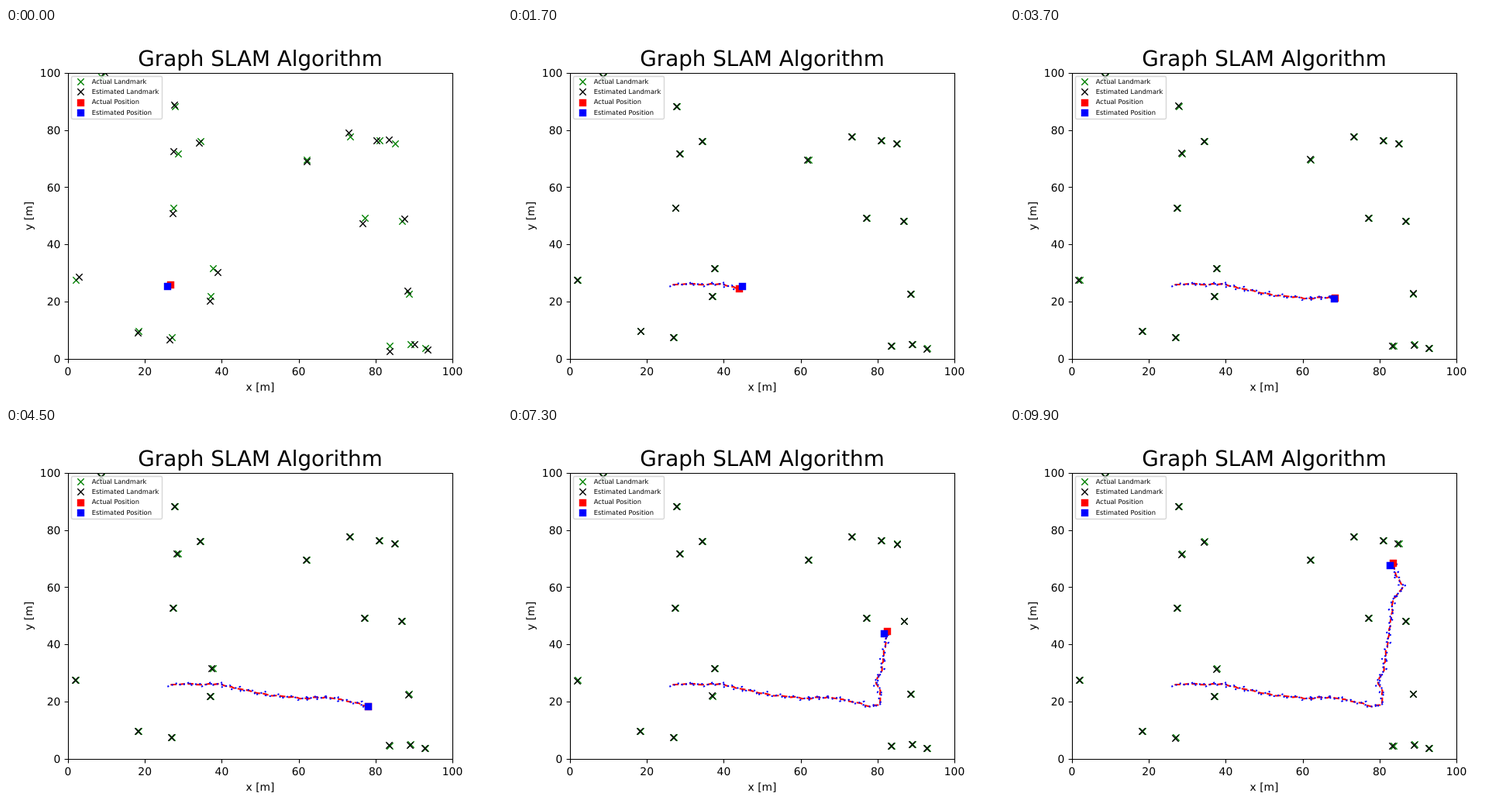
An HTML page for the animation above (10 s loop, 640 px wide and 480 px high).

```html
<!DOCTYPE html>
<html lang="en">
<head>
<meta charset="utf-8">
<title>Graph SLAM Algorithm</title>
<style>
html, body { margin: 0; width: 100%; height: 100%; overflow: hidden; background: #fff; }
svg { display: block; font: 13.89px "DejaVu Sans", sans-serif; text-rendering: geometricPrecision; }
</style>
</head>
<body>
<svg width="640" height="480" viewBox="0 0 640 480">
  <clipPath id="plot"><rect x="80" y="58" width="497" height="370"/></clipPath>
  <g id="scene" clip-path="url(#plot)"></g>
  <g id="axes"></g>
  <g id="legend" font-size="8.33"></g>
</svg>
<script>
const FRAME = 100, COUNT = 100;
const $ = id => document.getElementById(id);
const snap = v => Math.floor(v) + 0.5;

// Landmark positions in pixels
const landmarks = [
  [123, 63], [218, 101], [251, 146], [222, 162], [216, 232], [90, 325], [267, 310],
  [264, 346], [171, 391], [214, 399], [388, 170], [444, 140], [482, 145], [502, 149],
  [463, 245], [511, 249], [520, 343], [495, 410], [522, 408], [541, 413]];

// Turning points of the robot: step, x, y
const route = [
  [0, 213, 331], [12, 277, 330], [17, 299, 337], [24, 343, 345], [30, 386, 349], [36, 413, 347],
  [45, 467, 359], [48, 480, 357], [52, 480, 338], [56, 474, 328], [61, 482, 313], [73, 489, 263],
  [84, 495, 221], [90, 507, 204], [94, 499, 190], [99, 494, 175]];

// Repeatable noise between -0.5 and 0.5
const noise = n => {
  const s = Math.sin(n * 12.9898) * 43758.5453;
  return s - Math.floor(s) - 0.5;
};

function truePosition(step) {
  const next = Math.max(1, route.findIndex(key => key[0] >= step));
  const [s0, x0, y0] = route[next - 1], [s1, x1, y1] = route[next];
  const k = (step - s0) / (s1 - s0);
  return [x0 + (x1 - x0) * k + noise(step + 300) * 2, y0 + (y1 - y0) * k + noise(step + 500) * 2];
}

// The position estimate swings around the truth
function guessedPosition(step) {
  const [x, y] = truePosition(step), error = Math.cos(step * 2.41);
  return [x - 4 * error, y + 2.5 * error];
}

// Landmark guesses start several pixels off and settle close to the truth
const guessedLandmark = ([x, y], i, step) => {
  const offset = k => 0.5 + noise(i * 2 + k + 1) * 14 * Math.exp(-step / 4)
    + noise(step * 41 + i * 2 + k) * 1.2;
  return [x - 1 + offset(0), y + offset(1)];
};

const cross = ([x, y], color) =>
  `<path d="M${snap(x) - 4.17} ${snap(y) - 4.17}l8.34 8.34m0-8.34l-8.34 8.34" stroke="${color}" stroke-width="1.39"/>`;
const square = ([x, y], color) =>
  `<rect x="${snap(x) - 4.7}" y="${snap(y) - 4.7}" width="9.4" height="9.4" fill="${color}"/>`;
const label = (x, y, text, extra = '') => `<text x="${x}" y="${y}" ${extra}>${text}</text>`;
const trail = (position, step, color, dash) => {
  const points = Array.from({ length: step + 1 }, (_, s) => position(s));
  return `<polyline points="${points.join(' ')}" fill="none" stroke="${color}" stroke-width="2.08"
    stroke-linejoin="round" stroke-dasharray="${dash}"/>`;
};

function drawAxes() {
  let lines = 'M80.5 58.5H576.5V427.5H80.5Z', out = '';
  for (let k = 0; k <= 5; k++) {
    const x = 80 + 99.2 * k, y = 427.2 - 73.92 * k;
    lines += `M${Math.round(x) + 0.5} 427.5v4.9M80.5 ${Math.round(y) + 0.5}h-4.9`;
    out += label(x, 448, k * 20, 'text-anchor="middle"');
    out += label(70.3, Math.round(y + 5.1), k * 20, 'text-anchor="end"');
  }
  out += label(328, 49, 'Graph SLAM Algorithm', 'text-anchor="middle" font-size="27.78"');
  out += label(328, 468, 'x [m]', 'text-anchor="middle"');
  out += label(0, 0, 'y [m]', 'text-anchor="middle" transform="translate(34 242.4) rotate(-90)"');
  $('axes').innerHTML = `<path d="${lines}" fill="none" stroke="#000" stroke-width="1.11"/>` + out;
}

function drawLegend() {
  const rows = [
    ['Actual Landmark', cross, 'green'], ['Estimated Landmark', cross, '#000'],
    ['Actual Position', square, 'red'], ['Estimated Position', square, 'blue']];
  $('legend').innerHTML =
    '<rect x="84.5" y="62.5" width="117" height="55" rx="1.7" fill="#fff" stroke="#ccc" stroke-width="1.39" opacity=".8"/>' +
    rows.map(([text, mark, color], i) =>
      mark([96, 69.7 + 13.2 * i], color) + label(110.8, Math.round(72 + 13.2 * i), text)).join('');
}

function drawScene(step) {
  $('scene').innerHTML =
    landmarks.map(p => cross(p, 'green')).join('') +
    landmarks.map((p, i) => cross(guessedLandmark(p, i, step), '#000')).join('') +
    trail(truePosition, step, 'red', '7.7 3.33') +
    trail(guessedPosition, step, 'blue', '2.08 3.44') +
    square(truePosition(step), 'red') +
    square(guessedPosition(step), 'blue');
}

let shown = -1;
const start = performance.now();
function tick() {
  const step = Math.floor((performance.now() - start) / FRAME) % COUNT;
  if (step !== shown) drawScene(shown = step);
  requestAnimationFrame(tick);
}

drawAxes();
drawLegend();
tick();
</script>
</body>
</html>
```
